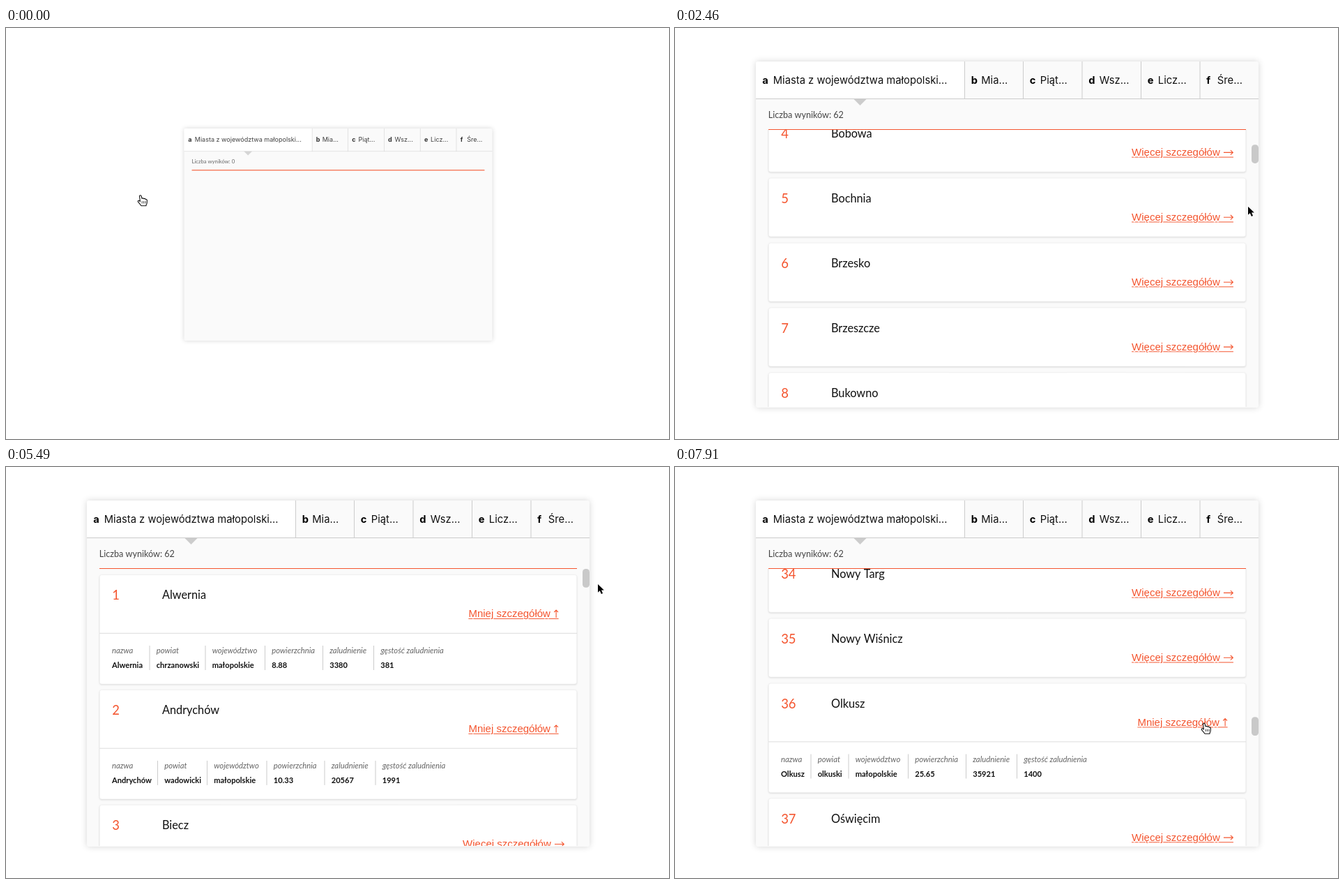
These frames come from a looping animation (951x589 px, 8000 ms). An HTML page with a canvas:

```html
<!DOCTYPE html>
<html lang="pl">
<head>
<meta charset="utf-8">
<title>Wyniki</title>
<style>
html, body { margin: 0; width: 100%; height: 100%; overflow: hidden; background: #fff; }
canvas { display: block; width: 951px; height: 589px; }
</style>
</head>
<body>
<canvas id="stage"></canvas>
<script>
const W = 951, H = 589, LOOP = 8000;
const canvas = document.getElementById('stage');
const ctx = canvas.getContext('2d');
const dpr = window.devicePixelRatio || 1;
canvas.width = W * dpr;
canvas.height = H * dpr;

const ACCENT = '#f4552f', RULE = '#ccc';
const LATO = 'Lato, sans-serif', TAB = 'Inter, sans-serif', LINK = '"Liberation Sans", Arial, sans-serif';
const BOX = { x: 116, y: 48, w: 721, h: 496 };
const CENTER = { x: 476.5, y: 296 };
const LIST_TOP = 146, LIST_END = 543, PITCH = 92.9, DETAIL = 72, TOTAL = 62;
const SHOT = 67, SHOT_LEAD = 25;

const tabs = [
  [116, 'a', 'Miasta z województwa małopolski...', 16],
  [415.5, 'b', 'Mia...', 15],
  [499.5, 'c', 'Piąt...', 15.5],
  [584, 'd', 'Wsz...', 16],
  [668.5, 'e', 'Licz...', 15.5],
  [753, 'f', 'Śre...', 16]
];

const cities = ('Alwernia,Andrychów,Biecz,Bobowa,Bochnia,Brzesko,Brzeszcze,Bukowno,Chełmek,Chrzanów,' +
  'Ciężkowice,Czchów,Dąbrowa Tarnowska,Dobczyce,Gorlice,Grybów,Jordanów,Kalwaria Zebrzydowska,' +
  'Kęty,Koszyce,Kraków,Krynica-Zdrój,Krzeszowice,Libiąż,Limanowa,Maków Podhalański,Miechów,' +
  'Mszana Dolna,Muszyna,Myślenice,Niepołomice,Nowe Brzesko,Nowy Sącz,Nowy Targ,Nowy Wiśnicz,' +
  'Olkusz,Oświęcim,Piwniczna-Zdrój,Proszowice,Rabka-Zdrój').split(',');

const labels = ['nazwa', 'powiat', 'województwo', 'powierzchnia', 'zaludnienie', 'gęstość zaludnienia'];
// start: when the row unfolds; seps: first two column dividers
const details = {
  0: { start: 4690, seps: [206, 286], data: ['Alwernia', 'chrzanowski', 'małopolskie', '8.88', '3380', '381'] },
  1: { start: 3216, seps: [217.5, 288.5], data: ['Andrychów', 'wadowicki', 'małopolskie', '10.33', '20567', '1991'] },
  35: { start: 7437, seps: [195, 249], data: ['Olkusz', 'olkuski', 'małopolskie', '25.65', '35921', '1400'] }
};
const UNFOLD = 370;

// [time, value...]
const scrollKeys = [
  [1876, 0], [1943, 5.3], [2479, 311], [2680, 400], [2690, 400], [3020, 0],
  [5896, 0], [6566, 2622], [6767, 3240]
];
const cursorKeys = [
  [938, 193, 239.5], [1500, 834, 274], [1675, 825, 250], [1943, 825, 250], [2479, 822, 256],
  [2680, 822, 256], [3082, 736, 300], [3953, 736, 300], [4489, 745, 197], [5100, 745, 197],
  [5490, 849, 168], [5495, 849, 168], [5762, 832, 158], [5896, 832, 158]
];
const dragKeys = [[5896, 832, 158], [6566, 837, 350], [6700, 838, 378]];
const leaveKeys = [[6901, 838, 378], [7370, 759, 367]];
const arrowTimes = [[950, 3000], [4070, 4400], [5190, 7290]];

const clamp = v => Math.max(0, Math.min(1, v));
const smooth = u => u * u * (3 - 2 * u);
const linear = u => u;
const span = (t, from, to) => clamp((t - from) / (to - from));

function track(keys, t, ease) {
  let i = 0;
  while (i < keys.length - 2 && t > keys[i + 1][0]) i++;
  const a = keys[i], b = keys[i + 1];
  const u = ease(span(t, a[0], b[0]));
  return a.slice(1).map((v, k) => v + (b[k + 1] - v) * u);
}

function text(str, x, y, font, color) {
  ctx.font = font;
  ctx.fillStyle = color;
  ctx.fillText(str, x, y);
}

function rect(x, y, w, h, color) {
  ctx.fillStyle = color;
  ctx.fillRect(x, y, w, h);
}

function roundBox(x, y, w, h, r, color) {
  ctx.beginPath();
  ctx.roundRect(x, y, w, h, r);
  ctx.fillStyle = color;
  ctx.fill();
}

function shadow(color, blur, dy) {
  ctx.shadowColor = color;
  ctx.shadowBlur = blur * dpr;
  ctx.shadowOffsetY = dy * dpr;
}

const noShadow = () => shadow('transparent', 0, 0);

const rightArrow = new Path2D('M1-4.7H14.4M10.9-8 14.4-4.7 10.9-1.4');
const upArrow = new Path2D('M4 .5V-10.3M1.2-7.4 4-10.3 6.8-7.4');

function drawLink(open, cx, y) {
  const str = open ? 'Mniej szczegółów ' : 'Więcej szczegółów ';
  ctx.font = '15px ' + LINK;
  const tw = ctx.measureText(str).width;
  const w = tw + (open ? 7.5 : 15), x = cx - w / 2;
  rect(x, y + 1.5, w, 1, ACCENT);
  // gaps in the underline around descenders
  ctx.save();
  ctx.beginPath();
  ctx.rect(x - 2, y + 1, w + 4, 6);
  ctx.clip();
  ctx.strokeStyle = '#fff';
  ctx.lineWidth = 2.4;
  ctx.strokeText(str, x, y);
  ctx.restore();
  text(str, x, y, '15px ' + LINK, ACCENT);

  ctx.save();
  ctx.translate(x + tw, y);
  ctx.strokeStyle = ACCENT;
  ctx.lineWidth = 1.1;
  ctx.stroke(open ? upArrow : rightArrow);
  ctx.restore();
}

function drawDetails(d, y) {
  const s = d.seps.slice();
  for (const step of [85.5, 83, 73]) s.push(s[s.length - 1] + step);
  rect(134, y + 83.3, 685, 1, '#ddd');
  labels.forEach((label, i) => {
    const x = i ? s[i - 1] + 9.7 : 152;
    text(label, x, y + 112.6, 'italic 11.3px ' + LATO, '#666');
    text(d.data[i], x, y + 133.6, 'bold 11.1px ' + LATO, '#111');
    if (i) rect(s[i - 1] - 0.5, y + 101.5, 1, 35, '#ccc');
  });
}

function drawCard(i, y, open) {
  const h = 84 + 72.6 * open;
  shadow('rgba(0,0,0,.17)', 2.5, 1);
  roundBox(134.3, y, 684.4, h, 3, '#fff');
  noShadow();
  ctx.strokeStyle = '#efefef';
  ctx.lineWidth = 0.8;
  ctx.stroke();
  text(String(i + 1), 152.2, y + 35.8, '18.4px ' + LATO, ACCENT);
  text(cities[i], 224, y + 34.8, '16.3px ' + LATO, '#111');
  drawLink(open > 0, 728, y + 60.9);
  if (!open) return;
  ctx.save();
  ctx.beginPath();
  ctx.rect(134, y, 685, h);
  ctx.clip();
  drawDetails(details[i], y);
  ctx.restore();
}

function drawList(t) {
  const scroll = track(scrollKeys, t, linear)[0];
  let y = 154.5 - scroll, extra = 0;
  ctx.save();
  ctx.beginPath();
  ctx.rect(130, LIST_TOP, 694, LIST_END - LIST_TOP);
  ctx.clip();
  cities.forEach((_, i) => {
    const d = details[i];
    const open = d ? smooth(span(t, d.start, d.start + UNFOLD)) : 0;
    const step = PITCH + DETAIL * open;
    if (y + step > LIST_TOP && y < LIST_END) drawCard(i, y, open);
    y += step;
    extra += DETAIL * open;
  });
  ctx.restore();
  const content = TOTAL * PITCH + extra + 9;
  roundBox(827, LIST_TOP + scroll * 392 / content, 10, 26.8, 4.5, '#c9c9c9');
}

function drawPanel(t) {
  const zoom = 0.613 + 0.387 * smooth(span(t, 0, 402));
  const loaded = span(t, 480, 730);
  const ink = 0.8 + 0.2 * loaded;

  ctx.save();
  ctx.translate(CENTER.x, CENTER.y);
  ctx.scale(zoom, zoom);
  ctx.translate(-CENTER.x, -CENTER.y);

  shadow('rgba(0,0,0,.17)', 10 * zoom, 0);
  roundBox(BOX.x, BOX.y, BOX.w, BOX.h, 3, '#fafafa');
  noShadow();
  roundBox(BOX.x, BOX.y, 299.5, 53.5, [3, 0, 0, 0], '#fff');

  ctx.globalAlpha = ink;
  tabs.forEach(([x, key, label, gap], i) => {
    if (i) rect(x - 0.5, BOX.y, 1, 53.5, RULE);
    text(key, x + 9.3, 79.8, 'bold 14.7px ' + TAB, '#000');
    text(label, x + 8.8 + gap, 79.8, '14.75px ' + TAB, '#111');
  });
  rect(BOX.x, 101, BOX.w, 1, RULE);
  ctx.beginPath();
  ctx.moveTo(256, 101.5);
  ctx.lineTo(275, 101.5);
  ctx.lineTo(265.5, 111);
  ctx.fillStyle = RULE;
  ctx.fill();

  text('Liczba wyników: ' + (loaded ? TOTAL : 0), 133.8, 129, '12.6px ' + LATO, '#444');

  ctx.globalAlpha = loaded;
  if (loaded) drawList(t);
  ctx.globalAlpha = ink;
  const weight = 2.2 - 1.2 * loaded;
  rect(134, 145.5 - weight / 2, 685, weight, ACCENT);
  ctx.restore();
}

const arrow = new Path2D('M0 0V11.8L2.8 9.2 4.9 14 7 13.1 5 8.5H8.8Z');
const hand = new Path2D('M-1.6 1.2Q-.4-.6 1 1L2 4.8Q3.6 3.8 4.6 5.2 6.2 4.4 7.2 6 9 5.6 9.4 7.8L9.2 11.2' +
  'Q9 13 8 14V15.3H1Q-.6 13-3.6 9.6-4.2 7.4-2.2 7.8L-.6 9Z');
const knuckles = new Path2D('M2.2 8.6V12M4.6 8.6V12M7 8.6V12');

function drawCursor(t) {
  const [x, y] = t >= 6901 ? track(leaveKeys, t, smooth)
    : t >= 5896 ? track(dragKeys, t, linear) : track(cursorKeys, t, smooth);
  const isArrow = arrowTimes.some(([a, b]) => t >= a && t < b);
  ctx.save();
  ctx.translate(x, y);
  ctx.lineJoin = 'round';
  if (isArrow) {
    ctx.strokeStyle = '#fff';
    ctx.lineWidth = 1.8;
    ctx.stroke(arrow);
    ctx.fillStyle = '#000';
    ctx.fill(arrow);
  } else {
    ctx.fillStyle = '#fff';
    ctx.fill(hand);
    ctx.strokeStyle = '#111';
    ctx.lineWidth = 1.1;
    ctx.stroke(hand);
    ctx.lineWidth = 0.8;
    ctx.stroke(knuckles);
  }
  if (t >= 5930 && t < 6760) {
    ctx.beginPath();
    ctx.arc(0.7, 1, 10.7, 0, Math.PI * 2);
    ctx.fillStyle = 'rgba(255,240,10,.7)';
    ctx.fill();
  }
  ctx.restore();
}

function frame() {
  const now = performance.now() % LOOP;
  const t = Math.floor((now + SHOT_LEAD) / SHOT) * SHOT;
  ctx.setTransform(dpr, 0, 0, dpr, 0, 0);
  rect(0, 0, W, H, '#fff');
  drawPanel(t);
  drawCursor(t);
  requestAnimationFrame(frame);
}
requestAnimationFrame(frame);
</script>
</body>
</html>
```
